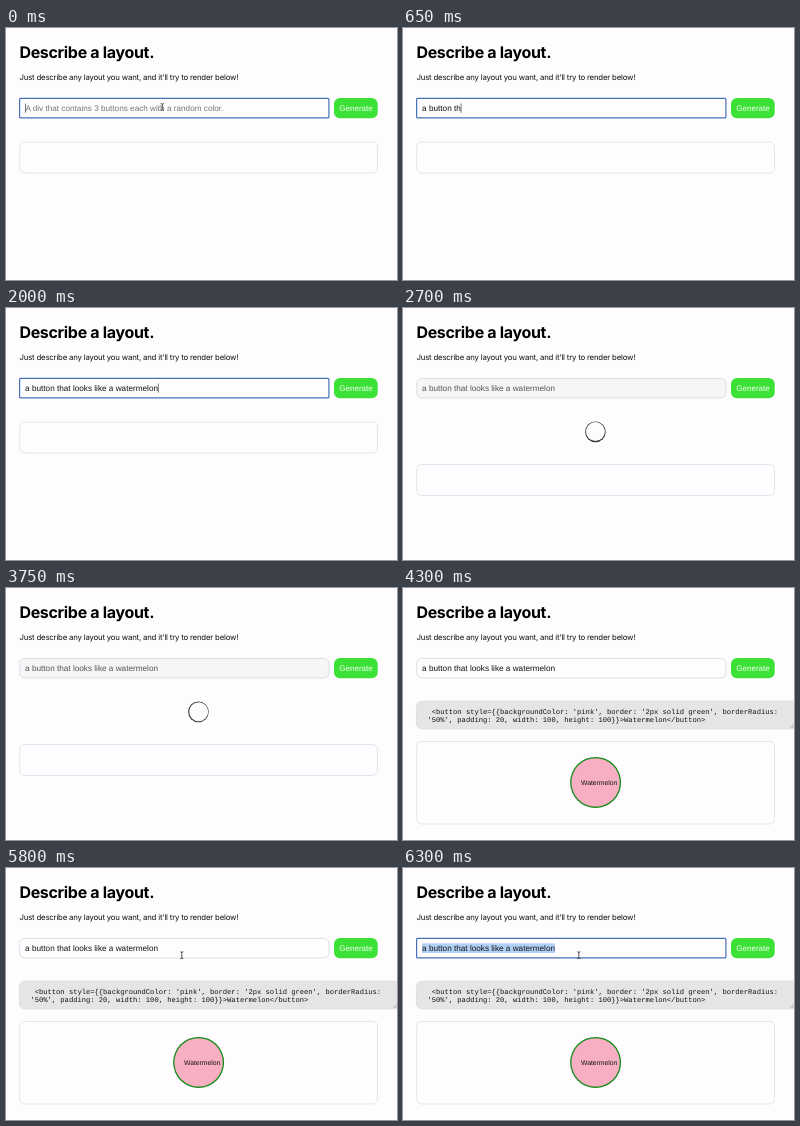
These frames come from a looping animation (391 px wide and 252 px high, 6500 ms). An HTML page with a canvas:

```html
<!DOCTYPE html>
<html lang="en">
<head>
<meta charset="utf-8">
<title>Describe a layout</title>
<style>
  html, body { margin: 0; width: 100%; height: 100%; overflow: hidden; background: #fefcfe; }
  canvas { display: block; width: 391px; height: 252px; }
</style>
</head>
<body>
<canvas id="stage"></canvas>
<script>
const W = 391, H = 252, LOOP = 6500;
const TYPE_START = 100, TYPE_STEP = 50;
const LOAD = 2050, RESULT = 4300;
const MOVE_START = 5000, MOVE_END = 5600, FOCUS = 6000, SELECT = 6150;

const PAGE = '#fefcfe', EDGE = '#dfdde1';
const SANS = '"Liberation Sans", Arial, sans-serif';
const UI = 'Inter, sans-serif';
const MONO = '"Liberation Mono", monospace';
const INPUT_FONT = `8.2px ${SANS}`;

const PROMPT = 'a button that looks like a watermelon';
const PLACEHOLDER = 'A div that contains 3 buttons each with a random color.';
const CODE = [
  " <button style={{backgroundColor: 'pink', border: '2px solid green', borderRadius:",
  "'50%', padding: 20, width: 100, height: 100}}>Watermelon</button>"
];

const canvas = document.getElementById('stage');
const ctx = canvas.getContext('2d');
const ratio = window.devicePixelRatio || 1;
canvas.width = W * ratio;
canvas.height = H * ratio;
ctx.textRendering = 'geometricPrecision';

function text(str, x, y, font, color, spacing = 0, align = 'left') {
  ctx.font = font;
  ctx.fillStyle = color;
  ctx.textAlign = align;
  ctx.letterSpacing = spacing + 'px';
  ctx.fillText(str, x, y);
}

function box(x, y, w, h, radius, fill, stroke, line = 0.8) {
  ctx.beginPath();
  ctx.roundRect(x, y, w, h, radius);
  if (fill) { ctx.fillStyle = fill; ctx.fill(); }
  if (stroke) { ctx.strokeStyle = stroke; ctx.lineWidth = line; ctx.stroke(); }
}

function disc(x, y, radius, color) {
  ctx.beginPath();
  ctx.arc(x, y, radius, 0, Math.PI * 2);
  ctx.fillStyle = color;
  ctx.fill();
}

function header() {
  text('Describe a layout.', 13.4, 30.2, `700 16px ${UI}`, '#000', -0.32);
  text("Just describe any layout you want, and it'll try to render below!",
    13.5, 52.2, `400 7.8px ${UI}`, '#111', -0.19);
}

function promptField(t) {
  const loading = t >= LOAD && t < RESULT;
  const focused = t < LOAD || t >= FOCUS;
  const count = Math.max(0, Math.floor((t - TYPE_START) / TYPE_STEP));
  const value = PROMPT.slice(0, count);

  if (focused) box(13.6, 70.4, 309.3, 19.5, 1, PAGE, '#4673b6', 1.2);
  else box(13.7, 70.4, 309.2, 19.6, 5, loading ? '#f7f5f7' : PAGE, '#d9d7db');

  ctx.font = INPUT_FONT;
  ctx.letterSpacing = '0px';
  const width = ctx.measureText(value).width;
  if (t >= SELECT) {
    ctx.fillStyle = '#b0d1f5';
    ctx.fillRect(19, 75.4, width, 9.6);
  }
  if (value) text(value, 19.1, 83, INPUT_FONT, loading ? '#555' : '#111');
  else text(PLACEHOLDER, 19.4, 83, INPUT_FONT, '#777');

  if (focused && t < SELECT) {
    ctx.fillStyle = '#444';
    ctx.fillRect(19 + width, 75.5, 0.7, 9.2);
  }
}

function generateButton() {
  box(328, 70, 43.7, 20.2, 6, '#3ce136');
  text('Generate', 350, 83.2, `8px ${SANS}`, '#f4fff4', 0, 'center');
}

function spinner(t) {
  const angle = Math.PI / 2 + (t - 2700) / 900 * Math.PI * 2;
  disc(192.4, 123.9, 10.3, '#333');
  disc(192.4 - 0.3 * Math.cos(angle), 123.9 - 0.3 * Math.sin(angle), 9.5, PAGE);
}

function result() {
  box(13.4, 113.2, 385, 27.6, 5, '#e6e5e6', '#d6d5d6', 0.6);
  CODE.forEach((line, i) => text(line, 24.4, 126 + i * 8.3, `7.14px ${MONO}`, '#111'));
  ctx.beginPath();
  ctx.moveTo(387.3, 140); ctx.lineTo(391, 136.3);
  ctx.moveTo(389.3, 140); ctx.lineTo(391, 138.3);
  ctx.strokeStyle = '#777';
  ctx.lineWidth = 0.5;
  ctx.stroke();

  box(13.7, 153.4, 357.8, 82.6, 5, null, EDGE);
  disc(192.6, 194.4, 25.5, '#148a17');
  disc(192.6, 194.4, 24.2, '#f8afc3');
  text('Watermelon', 178, 196.7, `6.8px ${SANS}`, '#111');
}

function pointer(x, y) {
  ctx.beginPath();
  ctx.moveTo(x - 1.6, y - 3.5);
  ctx.quadraticCurveTo(x, y - 3.5, x, y - 2.3);
  ctx.quadraticCurveTo(x, y - 3.5, x + 1.6, y - 3.5);
  ctx.moveTo(x, y - 2.5);
  ctx.lineTo(x, y + 2.5);
  ctx.moveTo(x - 1.6, y + 3.5);
  ctx.quadraticCurveTo(x, y + 3.5, x, y + 2.3);
  ctx.quadraticCurveTo(x, y + 3.5, x + 1.6, y + 3.5);
  ctx.strokeStyle = '#333';
  ctx.lineWidth = 0.8;
  ctx.stroke();
}

function mouse(t) {
  if (t >= TYPE_START && t < MOVE_START) return;
  const p = Math.min(1, Math.max(0, (t - MOVE_START) / (MOVE_END - MOVE_START)));
  const eased = p * p * (3 - 2 * p);
  pointer(156.3 + 19.5 * eased, 79 + 8.2 * eased);
}

function draw(t) {
  ctx.setTransform(ratio, 0, 0, ratio, 0, 0);
  ctx.fillStyle = PAGE;
  ctx.fillRect(0, 0, W, H);
  header();
  promptField(t);
  generateButton();
  if (t >= RESULT) {
    result();
  } else {
    const loading = t >= LOAD;
    if (loading) spinner(t);
    box(13.7, loading ? 156.5 : 114, 357.8, 31, 5, null, EDGE);
  }
  mouse(t);
}

const start = performance.now();
function tick() {
  draw((performance.now() - start) % LOOP);
  requestAnimationFrame(tick);
}
tick();
</script>
</body>
</html>
```
